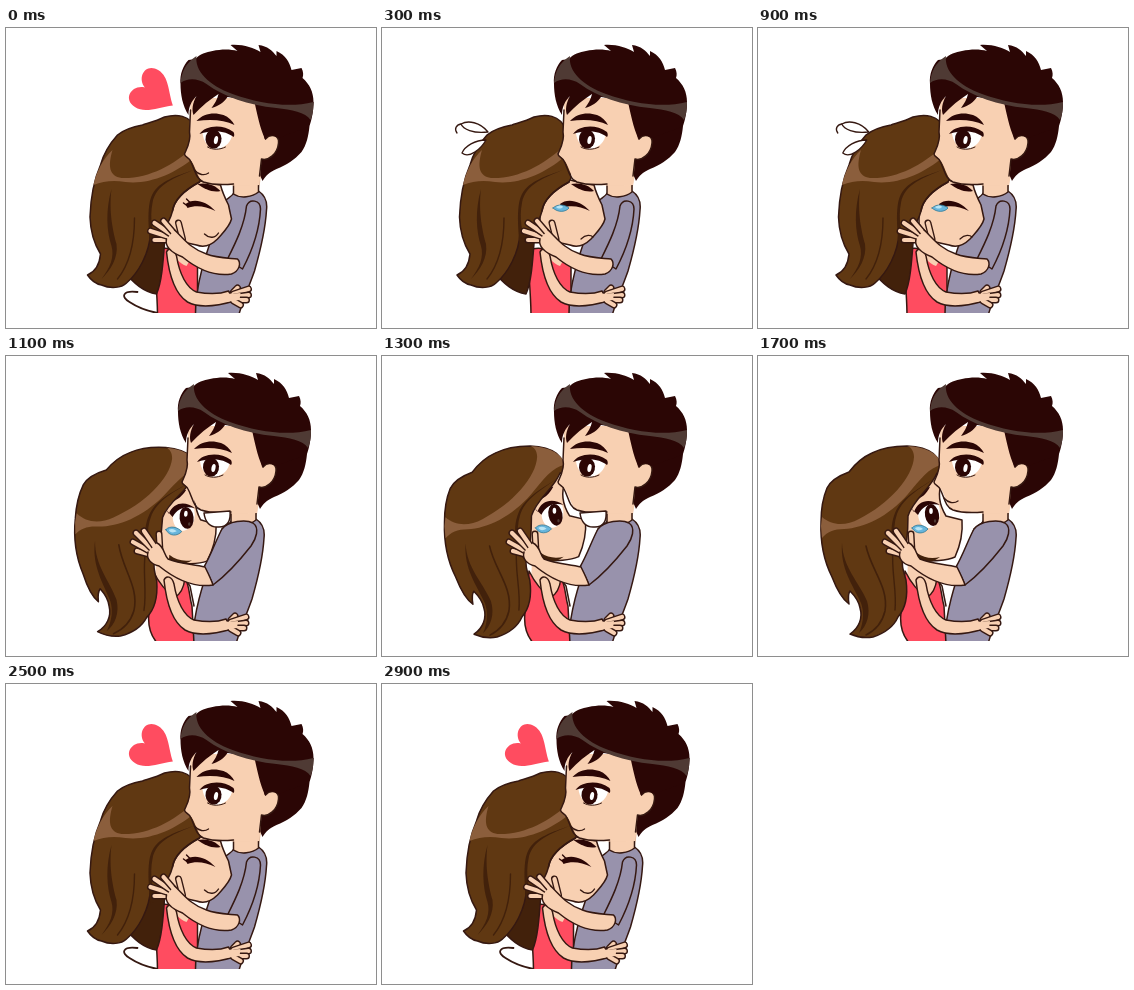
Write an HTML page with a canvas that moves like this. It is 370 px wide and 300 px high and loops after 3.1 s.

```html
<!DOCTYPE html>
<html lang="en">
<head>
<meta charset="utf-8">
<title>Comforting hug</title>
<style>
html, body { margin: 0; width: 100%; height: 100%; overflow: hidden; background: #fff; }
canvas { display: block; width: 370px; height: 300px; }
</style>
</head>
<body>
<canvas id="stage" width="370" height="300"></canvas>
<script>
const ctx = document.getElementById('stage').getContext('2d');
const LOOP = 3100;
const C = {
  line: '#351811', skin: '#f8d0b2', dark: '#2b0605', shine: '#4f3a34',
  hair: '#603812', gloss: '#8b5e3c', shade: '#42210b', shirt: '#9892ac',
  red: '#ff4c60', tear: '#67b5dc', white: '#fff'
};

function shape(d, fill, stroke = C.line, width = 1.5) {
  const p = new Path2D(d);
  if (fill) { ctx.fillStyle = fill; ctx.fill(p); }
  if (stroke) { ctx.strokeStyle = stroke; ctx.lineWidth = width; ctx.stroke(p); }
}
const line = (d, width = 1.5, color = C.line) => shape(d, null, color, width);
const flat = (d, fill) => shape(d, fill, null);

function oval(x, y, rx, ry, fill, turn = 0) {
  ctx.fillStyle = fill;
  ctx.beginPath();
  ctx.ellipse(x, y, rx, ry, turn, 0, Math.PI * 2);
  ctx.fill();
}

function fingers(paths, width = 7) {
  for (const d of paths) {
    line(d, width);
    line(d, width - 2.8, C.skin);
  }
}

function group(dx, dy, draw) {
  ctx.save();
  ctx.translate(dx, dy);
  draw();
  ctx.restore();
}

function manBody() {
  shape('M216 173C221 169 224 168 226 164L250 163C256 167 259 174 258 182C257 200 252 222 246 243C240 260 234 273 230 288L186 288C188 255 196 230 206 202Z', C.shirt);
  flat('M225 150L225 166C232 171 244 169 250 164L254 140Z', C.skin);
  line('M225 155L225 166C232 171 244 169 250 164L250 148');
}

function manHead(mouth) {
  // Back of the hair
  flat('M246 66L305 74C305 84 303 92 301 98C300 108 298 117 293 124C286 132 278 137 268 141C261 144 257 148 254 153L251 146L247 150L250 118Z', C.dark);
  // Face and ear
  flat('M182 70L250 70L256 111C262 105 271 107 270 115C269 126 260 133 253 131L251 157C235 158 203 158 195 154C188 150 187 136 181 131L176 126C178 121 183 113 181 104Z', C.skin);
  line('M182 82L181 104C183 113 178 121 176 126C176 129 181 130 182 133C186 140 187 151 195 154C204 157 214 157 225 156');
  line('M257 111C262 105 271 107 270 115C269 126 260 133 253 131L251 148');
  // Crown and fringe
  flat('M172 56C171 46 175 37 180 32L187 31C191 26 198 24 204 23C213 21 222 21 229 23L222 17C234 16 245 20 252 24L250 17C259 18 264 23 268 28L268 23C277 27 281 34 283 42L293 40C295 44 295 47 294 50C301 56 305 64 305 74C304 84 302 91 300 99L270 110C262 105 258 108 257 112C253 104 250 93 246 74C238 73 228 70 219 69C216 74 210 78 203 80C206 76 209 71 210 66C202 71 193 78 185 87C183 82 184 75 188 68C183 73 180 79 180 87C174 78 172 66 172 56Z', C.dark);
  flat('M172 55C173 44 177 35 188 28C186 43 200 57 224 66C252 76 281 80 305 74C305 82 304 87 302 92C297 84 283 82 268 80C239 77 216 69 198 56C189 50 179 50 172 55Z', C.shine);
  // Brow and eye
  flat('M188 93C195 85 206 84 215 87C220 89 224 93 226 97C216 92 203 91 188 93Z', C.dark);
  flat('M194 105C200 99 217 98 224 105C223 114 217 120 208 121C200 120 195 114 194 105Z', C.white);
  oval(205, 111, 8, 9.5, C.dark, -.08);
  oval(207.5, 112, 2, 4, C.white, .2);
  flat('M191 106C196 98 213 95 225 104C226 106 226 108 225 109C218 103 205 101 191 106Z', C.dark);
  line('M199 119C204 122 211 122 217 119', 1);
  if (mouth === 'smile') line('M186 142C190 147 196 148 200 145', 1.3);
  if (mouth === 'grin') {
    shape('M198 157L224 155C225 164 222 171 213 171C204 172 199 166 198 157Z', C.white);
  }
}

function girlArm() {
  shape('M158 224C160 219 166 220 168 228C171 246 178 260 188 264C199 266 209 267 220 263L226 273C209 278 190 280 179 274C165 265 160 243 158 224Z', C.skin);
  fingers(['M225 264L229 260', 'M225 266L240 261', 'M226 269L240 267', 'M226 272L238 272', 'M225 273L232 277']);
  flat('M217 266L232 265L231 272L217 274Z', C.skin);
}

function holdingArm() {
  shape('M238 178C241 170 252 172 252 181C251 202 243 224 234 241L219 231C227 215 236 197 238 178Z', C.shirt);
  fingers(['M164 212L146 212', 'M164 210L142 203', 'M165 208L146 195', 'M167 207L155 193', 'M174 211L170 195']);
  shape('M166 202C174 209 182 221 198 226C208 230 220 230 229 231C233 235 231 243 223 246C203 249 185 238 174 229C164 225 156 219 158 211', C.skin);
}

function hugHair() {
  shape('M109 240C122 257 132 264 144 266C151 250 151 222 154 190L136 185Z', C.shade);
  shape('M184 102C178 86 163 86 152 89C144 93 136 95 130 97C119 99 110 103 105 107C96 117 91 126 88 137C81 153 78 173 77.5 189C78 205 83 218 88 226C87 237 82 244 75 247C79 253 84 256 89 257C98 261 109 260 114 255C126 245 137 225 138 205C147 207 156 198 160 183C162 170 174 161 187 154L189 150Z', C.hair);
  flat('M81 157C84 143 91 130 100 122C95 139 97 148 109 150C136 151 161 137 180 120L182 129C163 146 135 157 113 154C101 152 91 153 81 157Z', C.gloss);
  flat('M181 142C164 149 143 156 140 175C137 190 140 204 144 216L138 221C136 200 134 177 140 166C147 153 164 148 181 142Z', C.shade);
  flat('M99 161C96 185 101 205 104 216C106 230 98 242 89 251C98 239 102 229 99 218C94 203 93 182 99 161Z', C.shade);
  line('M122 190C122 213 118 235 105 251', 1.4, C.shade);
  line('M160 183C162 170 174 161 187 154', 1.5);
}

const closedEye = 'M177 176C184 170 197 172 207 183C197 178 187 177 179 180Z';

function heldFace(happy) {
  shape('M158 168C166 155 180 149 192 153L212 157C214 165 217 171 220 177L223 191C221 199 214 205 209 211C203 217 196 220 188 217L170 213L158 196Z', C.skin);
  flat('M189 156C198 154 207 157 212 163C204 165 196 161 189 156Z', C.dark);
  if (happy) {
    flat(closedEye, C.dark);
    line('M179 178L175 175M182 175L178 171', 1.4, C.dark);
    line('M196 206C201 211 207 210 210 205', 1.4);
  } else {
    group(1, 0, () => flat(closedEye, C.dark));
    shape('M171 180C176 175 184 177 187 180C184 184 176 185 171 180Z', C.tear, '#337a96', .8);
    flat('M174 179C177 177 180 177 181 179C179 181 176 181 174 179Z', '#b9e4f4');
    line('M199 211C204 206 209 207 211 209', 1.2);
  }
}

function sweat() {
  shape('M106 104C98 94 86 92 79 96C81 101 91 106 106 104Z', C.white, C.line, 1.3);
  shape('M104 112C93 112 83 118 80 125C87 131 99 121 104 112Z', C.white, C.line, 1.3);
  line('M79 96C74 97 72 101 75 105', 1.3);
}

function holding(happy, shake) {
  manBody();
  if (happy) line('M129 264C114 262 112 269 121 274C130 280 139 283 149 285', 1.8);
  shape('M146 222C161 217 181 224 189 238L189 262C187 272 187 280 187 288L149 288C149 265 146 243 146 222Z', C.red);
  flat('M160 212L174 215L184 228L178 238C171 236 166 229 160 220Z', C.skin);
  group(shake, 0, () => {
    heldFace(happy);
    group(happy ? 4 : 0, 0, hugHair);
  });
  manHead(happy ? 'smile' : '');
  girlArm();
  holdingArm();
  if (!happy) group(shake * 1.6, 0, sweat);
}

function liftedHead() {
  flat('M145 142C155 124 170 116 184 126C179 138 182 150 188 160L204 164C205 177 202 190 197 201C188 205 175 205 161 205L140 190Z', C.skin);
  line('M184 126C179 138 182 150 188 160L204 164C205 177 202 190 197 201C188 205 175 205 161 205');
  // Brow, eye and tear
  flat('M157 144C158 137 164 132 172 131C168 138 164 142 157 144Z', C.dark);
  flat('M160 157C164 146 175 143 181 150C184 160 180 171 171 172C164 172 160 165 160 157Z', C.white);
  oval(174, 159, 7, 11, C.dark, -.18);
  oval(173, 155, 1.8, 3, C.white);
  oval(177, 165, 1.2, 1.8, C.shine);
  flat('M156 156C160 144 172 142 182 149C173 147 165 149 160 159L153 152Z', C.dark);
  shape('M154 172C158 167 166 169 170 173C166 178 158 179 154 172Z', C.tear, '#337a96', .8);
  flat('M157 172C160 170 163 171 165 173C162 175 158 175 157 172Z', '#b9e4f4');
  flat('M159 197C166 202 174 203 182 201C176 206 167 207 159 206Z', C.shade);
  // Long hair
  shape('M185 121C184 99 172 91 149 90C135 90 122 93 114 97C105 101 97 108 91 116C80 120 72 126 69 132C64 144 63 156 63 166C62 190 67 207 74 221C79 234 84 243 91 248C90 242 90 238 92 235C97 240 101 246 102 252C105 262 101 272 92 278C101 282 109 282 115 281C127 277 136 270 140 261C148 252 150 239 148 224C145 214 143 207 145 202C149 190 150 174 150 160C155 143 172 134 179 117Z', C.hair);
  flat('M63 170L64 161C74 170 88 170 101 163C131 148 155 121 156 101C156 95 153 91 149 90C166 91 180 96 184 109C171 111 162 124 150 138C130 161 106 172 86 173C76 173 69 176 64 182Z', C.gloss);
  flat('M178 121C164 132 146 140 139 158C133 176 138 191 145 207C134 194 130 174 137 157C144 140 163 132 178 121Z', C.shade);
  flat('M84 187C85 212 101 226 109 245C113 258 109 270 101 277C106 266 106 255 103 247C95 229 82 213 84 187Z', C.shade);
  line('M108 190C113 214 131 231 127 255C124 268 116 275 108 279', 1.6, C.shade);
  line('M135 195C133 215 139 234 137 254', 1.4, C.shade);
}

function cheekArm() {
  shape('M216 173C222 165 240 163 247 167C254 172 250 183 245 190C234 204 222 218 207 229C204 222 202 217 198 211C205 199 210 184 216 173Z', C.shirt);
  fingers(['M146 199L131 195', 'M147 197L127 186', 'M148 195L130 177', 'M151 194L138 175', 'M154 196L153 178']);
  shape('M151 187C158 190 158 199 162 203C174 208 186 208 199 211C202 217 205 223 207 229C188 232 169 223 153 210C145 208 140 203 142 196', C.skin);
}

function lifted(mouth, tilt) {
  manBody();
  flat('M150 204L171 204L182 222L184 254L148 250Z', C.skin);
  line('M169 207C172 216 178 222 184 230L188 250');
  shape('M147 215C152 225 160 236 169 241C175 238 178 230 179 222C184 231 183 240 186 250L188 288L152 288C143 278 141 264 144 250Z', C.red);
  group(130, 270, () => {
    ctx.rotate(tilt);
    group(-130, -270, liftedHead);
  });
  manHead(mouth);
  girlArm();
  cheekArm();
}

function heart(x, y) {
  group(x, y, () => {
    ctx.rotate(-1);
    ctx.scale(1.15, 1.15);
    flat('M0 20C-8 10 -19 4 -19 -7C-19 -20 -4 -20 0 -9C4 -20 19 -20 19 -7C19 4 8 10 0 20Z', C.red);
  });
}

function hug(beat) {
  group(2.5, 0, () => holding(true, 0));
  if (beat) heart(147.5, 65);
  else heart(139, 62.5);
}

function scene(t) {
  if (t < 100) return hug(true);
  if (t < 1100) return holding(false, Math.floor((t - 100) / 200) % 2 ? 0 : 3);
  if (t < 1300) return lifted('grin', .06);
  if (t < 1500) return lifted('grin', -.005);
  if (t < 2300) return lifted('smile', 0);
  hug(Math.floor((t - 2300) / 200) % 2 === 1);
}

function frame() {
  ctx.fillStyle = C.white;
  ctx.fillRect(0, 0, 370, 300);
  ctx.save();
  ctx.beginPath();
  ctx.rect(0, 0, 370, 285);
  ctx.clip();
  ctx.lineCap = ctx.lineJoin = 'round';
  scene(performance.now() % LOOP);
  ctx.restore();
  requestAnimationFrame(frame);
}
frame();
</script>
</body>
</html>
```
